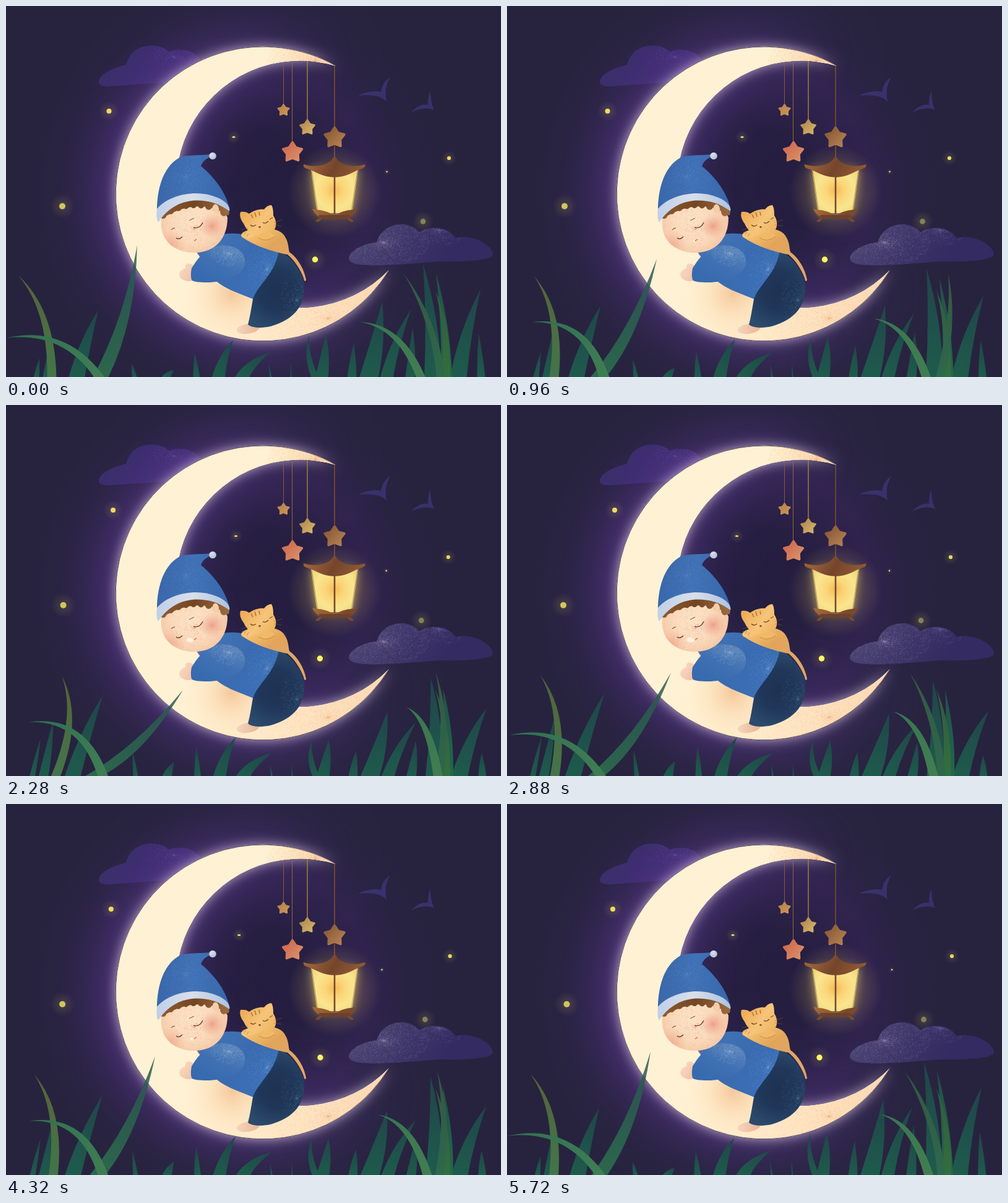
An HTML page with a canvas that plays this animation: 800 px wide and 600 px high, repeating every 5760 ms.

```html
<!DOCTYPE html>
<html>
<head>
<meta charset="utf-8">
<style>
html, body { margin: 0; width: 100%; height: 100%; overflow: hidden; background: #27233f; }
canvas { display: block; }
</style>
</head>
<body>
<canvas id="stage" width="800" height="600"></canvas>
<script>
const LOOP = 5760;
const stage = document.getElementById('stage').getContext('2d');
const back = document.createElement('canvas');
back.width = 800;
back.height = 600;
const g = back.getContext('2d');

let seed = 7;
const rnd = () => (seed = seed * 16807 % 2147483647) / 2147483647;

function stops(gradient, colors) {
  colors.forEach((c, i) => gradient.addColorStop(i / (colors.length - 1), c));
  return gradient;
}
const lin = (x0, y0, x1, y1, ...colors) => stops(g.createLinearGradient(x0, y0, x1, y1), colors);
const rad = (x, y, r, ...colors) => stops(g.createRadialGradient(x, y, 0, x, y, r), colors);

function fill(d, style) {
  const p = new Path2D(d);
  g.fillStyle = style;
  g.fill(p);
  return p;
}
function line(d, style, width) {
  g.strokeStyle = style;
  g.lineWidth = width;
  g.stroke(new Path2D(d));
}
function oval(c, x, y, rx, ry, angle, style) {
  c.fillStyle = style;
  c.beginPath();
  c.ellipse(x, y, rx, ry, angle, 0, 7);
  c.fill();
}
function inside(path, draw) {
  g.save();
  g.clip(path);
  draw();
  g.restore();
}
// Round soft patch of colour
function blush(x, y, r, ...colors) {
  g.fillStyle = rad(x, y, r, ...colors);
  g.fillRect(x - r, y - r, 2 * r, 2 * r);
}
// Soft speckle, densest at the middle of an ellipse
function grain(path, n, color, x, y, rx, ry) {
  inside(path, () => {
    g.fillStyle = color;
    for (let i = 0; i < n; i++) {
      const a = rnd() * 6.283, r = rnd();
      g.fillRect(x + rx * r * Math.cos(a), y + ry * r * Math.sin(a), 1, 1);
    }
  });
}
function glow(color, blur, draw) {
  g.save();
  g.shadowColor = color;
  g.shadowBlur = blur;
  draw();
  g.restore();
}

function drawSky() {
  g.fillStyle = '#27233f';
  g.fillRect(0, 0, 800, 600);
  blush(370, 300, 330, '#241d3e', '#251e40', '#30234e', 'rgba(39,35,63,0)');

  const far = fill('M150 123C151 108 178 99 194 95C199 75 214 64 235 64C250 64 258 69 263 74C284 66 308 73 316 90L290 122C250 124 205 127 165 130C155 130 150 127 150 123Z',
    lin(160, 70, 270, 135, '#383068', '#3a2b6c', '#402a70'));
  grain(far, 500, 'rgba(110,95,165,.3)', 270, 82, 50, 20);

  fill('M569 145C582 138 597 137 606 139C607 129 612 121 621 115C614 128 612 138 615 155C607 145 590 143 569 145Z', '#39316c');
  fill('M655 172C663 163 673 158 682 160C682 150 683 143 686 138C686 150 688 160 692 168C680 163 668 166 655 172Z', '#39316c');
}

function drawMoon() {
  const rim = 'M533 97A238 238 0 1 0 619 427';
  const d = rim + 'A200 200 0 1 1 533 97Z';
  glow('rgba(105,65,165,.75)', 100, () => fill(d, '#fff2d6'));
  glow('rgba(235,215,235,.75)', 20, () => fill(d, '#fff2d6'));
  const moon = fill(d, lin(200, 250, 620, 400, '#fff2d4', '#fff1d3', '#ffe9c8', '#fbdab4'));
  line(rim, 'rgba(45,32,65,.75)', 1);
  inside(moon, () => {
    blush(505, 85, 85, 'rgba(247,205,160,.6)', 'rgba(247,205,160,0)');
    blush(365, 465, 75, 'rgba(240,180,130,.65)', 'rgba(245,200,150,.25)', 'rgba(250,220,180,0)');
  });
  grain(moon, 1100, 'rgba(240,170,120,.35)', 500, 88, 80, 35);
  grain(moon, 1800, 'rgba(240,170,120,.3)', 520, 505, 115, 75);
}

function drawNearCloud() {
  const cloud = fill('M554 408C556 394 580 384 599 382C605 362 622 353 640 353C655 354 664 360 668 366C686 353 716 358 727 375C752 368 786 385 787 402C785 412 740 414 700 413C650 417 600 422 570 418C558 416 554 412 554 408Z',
    lin(590, 355, 700, 430, '#4a4472', '#3d3568', '#332b61'));
  grain(cloud, 1900, 'rgba(145,135,175,.32)', 610, 382, 75, 38);
  grain(cloud, 700, 'rgba(125,115,170,.3)', 700, 362, 45, 25);
}

function star(x, y, r, from, to) {
  g.beginPath();
  for (let i = 0; i < 10; i++) {
    const a = i * Math.PI / 5 - Math.PI / 2, k = (i % 2 ? .53 : .9) * r;
    g.lineTo(x + k * Math.cos(a), y + k * Math.sin(a));
  }
  g.closePath();
  g.lineJoin = 'round';
  g.lineWidth = r * .2;
  g.strokeStyle = g.fillStyle = lin(x - r, y - r, x + r, y + r, from, to);
  g.fill();
  g.stroke();
}

function drawMobile() {
  line('M448.5 91V160', '#8a5b35', 1);
  line('M462.5 90V222', '#96673c', 1);
  line('M487 89V185', '#a57b45', 1.5);
  line('M531 97V248', '#7d4c2e', 1.6);
  star(448.5, 168.5, 10.5, '#b07d48', '#d29a58');
  star(487, 196.5, 13.5, '#a77f49', '#e0bd70');
  star(463, 236.5, 18, '#cb5f4a', '#dd9a70');
  star(531, 213, 18.5, '#80512f', '#bd8a5a');

  blush(531, 300, 75, 'rgba(240,205,100,.5)', 'rgba(225,190,95,.22)', 'rgba(220,180,90,0)');
  glow('rgba(250,220,110,.6)', 14, () =>
    fill('M493 265H569L559 335H503Z', rad(531, 298, 46, '#f5b95d', '#fad779', '#fae58f', '#ecd67c')));
  line('M531 270V336', '#7b4927', 2.6);
  line('M494 266L504 334M568 266L558 334', '#b48e4d', 1);
  fill('M481 256C500 262 521 259 529 245H533C541 259 562 262 580 256C582 259 579 262 575 263C560 268 550 277 531 277C512 277 502 268 486 263C482 262 480 259 481 256Z',
    lin(500, 245, 560, 278, '#9b6038', '#74452b', '#8d5633'));
  fill('M495 328C510 331 524 331 531 342C538 331 552 331 567 328C563 337 557 341 550 344H512C505 341 499 337 495 328Z',
    lin(500, 328, 545, 345, '#a36738', '#7b4a2c'));
  fill('M506 338H556V344H506Z', '#6e4129');
  fill('M510 342C509 348 504 351 500 348L504 344ZM552 342C553 348 558 351 562 348L558 344Z', '#7b4a2c');
}

function drawBoy() {
  oval(g, 391, 522, 18.5, 8, -.15, lin(373, 520, 410, 525, '#f5d6bd', '#e8b494'));
  const shirt = fill('M310 397C320 377 350 362 385 370L444 394C442 427 427 455 402 475C375 464 347 456 331 436Z',
    lin(330, 375, 420, 465, '#4173b5', '#3a6bb0', '#3c70b8'));
  grain(shirt, 900, 'rgba(120,165,215,.3)', 422, 425, 35, 45);
  const pants = fill('M441 396C453 399 477 423 482 450C484 484 466 507 428 518C410 522 396 520 391 515C394 505 396 491 399 474C408 449 434 435 441 396Z',
    rad(440, 460, 65, '#1e3253', '#20375a', '#2c4b6c'));
  grain(pants, 650, 'rgba(100,140,165,.25)', 470, 475, 28, 45);

  fill('M304 421C298 414 288 415 290 424C279 427 277 438 285 442C292 447 302 445 307 442Z',
    lin(280, 420, 307, 440, '#fbdcc2', '#efbfa5'));
  const arm = fill('M300 424C312 405 325 388 350 387C375 387 389 401 386 418C381 438 350 447 325 447C312 447 302 446 300 443C298 436 299 430 300 424Z',
    lin(355, 388, 325, 445, '#5580b8', '#3f70b3', '#376aae'));
  grain(arm, 700, 'rgba(150,180,215,.35)', 360, 400, 30, 20);

  const face = fill('M251 343C247 377 270 399 304 399C336 399 358 378 358 342C345 312 270 310 251 343Z',
    rad(302, 350, 62, '#fde3c6', '#fadcbd', '#f4c3a1'));
  inside(face, () => {
    blush(333, 356, 21, 'rgba(232,140,120,.75)', 'rgba(240,170,145,0)');
    blush(266, 386, 24, 'rgba(238,155,130,.6)', 'rgba(240,170,145,0)');
  });
  grain(face, 650, 'rgba(235,145,120,.25)', 304, 360, 54, 42);

  const hair = lin(255, 330, 355, 330, '#8b5930', '#734522', '#99683c');
  fill('M249 340C275 304 330 298 360 327C362 335 360 341 357 338L340 328Q300 316 258 340Z', hair);
  // Curls along the hairline
  for (let i = 0; i < 9; i++) {
    const u = i / 8;
    oval(g, 254 + 98 * u, 336 - 60 * u * (1 - u) - 4 * u, 6, 8, 0, hair);
  }
  oval(g, 339, 328, 5, 7.5, -.2, '#f5cda9');
  line('M275 375Q279 379 285 373M303 358Q313 361 318 350', '#70432f', 1.4);
  line('M296 347L304 343M267 362Q270 359 273 359', '#9f6d4a', 1.3);
  line('M304 380L308 377', '#cf655a', 1.4);

  const hat = fill('M244 330C244 300 252 262 279 246C290 240 312 242 331 240V244C325 246 318 250 315 259C335 275 355 300 361 327C325 300 275 300 244 330Z',
    lin(250, 285, 355, 300, '#3a68ab', '#4071b6', '#3869ac'));
  grain(hat, 700, 'rgba(120,160,215,.25)', 290, 275, 40, 40);
  fill('M244 328C262 307 300 298 330 306C346 310 359 318 361 327C362 330 361 333 360 331C341 317 320 313 300 315C275 318 258 332 246 350C243 345 243 335 244 328Z',
    lin(245, 330, 360, 320, '#c1d0e8', '#d8dfea', '#afc3df'));
  oval(g, 334, 242.5, 5.8, 5.8, 0, rad(332, 240, 9, '#dce0ea', '#b3bfd9'));
}

function drawCat() {
  fill('M381 373C400 358 442 353 452 375C457 384 456 391 458 398C471 407 482 425 485 443C484 446 482 446 481 440C476 426 466 411 455 402C435 398 402 389 381 373Z',
    lin(420, 360, 450, 405, '#f2bc6c', '#e2a45a', '#dfa765'));
  fill('M384 352C379 345 377 339 379 333C385 332 389 333 393 336C401 330 411 328 417 329C420 325 424 322 429 322C432 327 432 334 432 339C440 351 437 365 423 370C407 375 391 369 384 352Z',
    lin(385, 335, 435, 370, '#eead5a', '#f6c57a', '#eab15f'));
  oval(g, 392, 369, 12, 6.5, -.2, '#f5c478');
  oval(g, 420, 373, 14, 6, -.1, '#f0b968');
  line('M385 370L388 366M389 373L392 368M408 375Q420 383 434 373', '#bd7c38', .8);
  line('M396 337L399 343M402 334L404 341M409 333L410 339M431 342L426 345', '#b27131', 1.5);
  line('M395 354Q399 358 404 354M415 350Q419 353 424 348', '#79451f', 1.2);
  oval(g, 410, 357.5, 1.8, 1.4, 0, '#8d4e2b');
  line('M433 350L446 346M433 354L445 356M391 359L380 362M391 362L382 368', 'rgba(145,97,48,.65)', .7);
}

[drawSky, drawMoon, drawNearCloud, drawMobile, drawBoy, drawCat].forEach(draw => draw());

// Smooth curve through (time, value) points, flat at turning points
function curve(times, values) {
  const last = times.length - 1;
  const slope = values.map((v, i) => {
    if (i === 0 || i === last) return 0;
    const before = v - values[i - 1], after = values[i + 1] - v;
    return before * after <= 0 ? 0 : (before + after) / (times[i + 1] - times[i - 1]);
  });
  return t => {
    let i = 0;
    while (i < last - 1 && t > times[i + 1]) i++;
    const h = times[i + 1] - times[i], u = Math.min(1, (t - times[i]) / h), w = 1 - u;
    return values[i] * w * w * (1 + 2 * u) + values[i + 1] * u * u * (3 - 2 * u)
      + h * u * w * (slope[i] * w - slope[i + 1] * u);
  };
}

const breeze = curve([0, 960, 1600, 2400, 3600, 4920, LOOP], [0, .28, .53, .88, 1, .5, 0]);
const GUST = [0, 960, 1600, 2880, 3240, 3680, 4540, 4920, LOOP];
const bend = curve(GUST, [0, 40, 63, 5, 0, 10, 42, 34, 0]);
const reed = curve(GUST, [0, 70, 85, 8, 0, 27, 57, 49, 0]);
const SWING = [0, 960, 1600, 1850, 2880, 3680, 4920, 5140, 5720];
const leftSwing = curve(SWING, [0, 24, 81, 85, 34, 0, 62, 66, 18]);
const moonSwing = curve(SWING, [0, 30, 75, 80, 53, 5, 64, 69, 20]);
const rightSwing = curve(SWING, [0, 19, 77, 81, 51, 0, 69, 74, 30]);

function blade(bx, w, cx, cy, tx, ty, root, tip) {
  const len = Math.hypot(tx - bx, ty - 602);
  const nx = (602 - ty) / len * w * .38, ny = (tx - bx) / len * w * .38;
  const paint = stage.createLinearGradient(bx, 600, tx, ty);
  paint.addColorStop(0, root);
  paint.addColorStop(1, tip);
  stage.fillStyle = paint;
  stage.beginPath();
  stage.moveTo(bx - w / 2, 602);
  stage.quadraticCurveTo(cx - nx, cy - ny, tx, ty);
  stage.quadraticCurveTo(cx + nx, cy + ny, bx + w / 2, 602);
  stage.fill();
}

// Base x, width, arch, tip x, tip y
const tufts = [
  [67, 16, 2, 72, 540],
  [49, 9, 0, 54, 570],
  [114, 26, -5, 149, 492],
  [208, 8, 0, 203, 578],
  [258, 16, -2, 271, 589],
  [308, 11, 0, 305, 562],
  [343, 21, -6, 367, 540],
  [381, 24, -13, 427, 560],
  [428, 3, 0, 425, 578],
  [461, 2, 0, 460, 575],
  [500, 12, -11, 490, 533],
  [510, 21, 3, 517, 530],
  [559, 15, 0, 562, 545],
  [586, 31, 6, 608, 478],
  [615, 21, -8, 655, 490],
  [653, 16, 2, 657, 520],
  [690, 28, 9, 674, 417],
  [731, 27, -8, 767, 458],
  [768, 13, 0, 764, 530]
];

// Tall blades lean further; those on the left rise while those on the right sink
function sway([bx, w, arch, x0, y0], s, root, tip) {
  const x = x0 + (600 - y0) * .08 * s, y = y0 + (x0 - 400) * .105 * s;
  const b = bx + (bx < 130 ? -8 : 2) * s;
  blade(b, w, (b + x) / 2 + arch, (600 + y) / 2, x, y, root, tip);
}

function drawGrass(t) {
  const s = breeze(t);
  tufts.forEach(tuft => sway(tuft, s, '#1e5b4c', '#20454a'));
  sway([712, 18, 8, 695, 432], s, '#20684a', '#23504a');
  blade(711, 13, 715, 520, 694, 460, '#336f3c', '#315a42');

  const r = reed(t);
  blade(703 - r * .05, 14, 693 + r * .44, 508, 643 + r, 433, '#2e684c', '#345743');
  const k = rightSwing(t);
  blade(671 + k * .37, 15, 638 + k * .62, 518 - k * .15, 573 + k, 511 - k * .3, '#427d51', '#387652');
  const m = moonSwing(t);
  blade(152 - m * .2, 25, 200 + m * .2, 510 + m * .7, 212 + m, 387 + m * .55 + m * m * .006,
    'rgba(44,105,76,.98)', 'rgba(42,87,82,.82)');
  const l = leftSwing(t);
  blade(74 + l * .08, 15, 74 + l * .64, 492 + l * .2, 20 + l, 436 + l * .04, '#43754a', '#566337');
  const b = bend(t);
  blade(152 + b * .14, 17, 95 + b * .8, 520 - b * .4, b, 537 - b * .64, '#407d54', '#2f7052');
}

// One wandering light: height, radii, colour, x over time
const DRIFT = [0, 960, 1600, 2880, 3680, 4920, 5720];
const light = (y, rx, ry, color, ...xs) => ({ y, rx, ry, color, x: curve(DRIFT, xs) });
const lights = [
  light(170, 4, 4, '#f2da63', 166.5, 162.5, 170, 174, 168.5, 171, 171),
  light(323.7, 5, 5, '#d4c45c', 91, 93, 94.5, 91, 93, 89.5, 96.5),
  light(212, 2.7, 1.2, '#f5e66b', 368, 380, 373, 371.5, 377, 374.5, 365),
  light(268, 1.2, 1.2, '#f0e572', 615.5, 618.5, 610.5, 618, 609, 607.5, 622),
  light(246, 3.1, 3.1, '#efd75f', 716, 715, 712, 717, 716, 719, 719),
  light(348.5, 4.4, 4.4, '#86815a', 674, 671.5, 674, 669, 670, 682, 673.5),
  light(410, 4.7, 4.7, '#fdf765', 499.5, 513.5, 506, 508.5, 504.5, 511, 505)
];

function drawLights(t) {
  for (const { y, rx, ry, color, x } of lights) {
    const cx = x(t), r = rx * 4;
    const halo = stage.createRadialGradient(cx, y, 0, cx, y, r);
    halo.addColorStop(0, 'rgba(230,215,90,.16)');
    halo.addColorStop(1, 'rgba(230,215,90,0)');
    oval(stage, cx, y, r, r, 0, halo);
    oval(stage, cx, y, rx, ry, 0, color);
  }
}

function drawBubble(t) {
  const s = Math.sin(Math.PI * t / LOOP) ** 2;
  oval(stage, 304 - 7.5 * s, 380, .3 + 6 * s, .3 + 3.5 * s, .15, '#fff1e3');
}

function frame(now) {
  const t = now % LOOP;
  stage.drawImage(back, 0, 0);
  drawLights(t);
  drawBubble(t);
  drawGrass(t);
  requestAnimationFrame(frame);
}
frame(performance.now());
</script>
</body>
</html>
```
